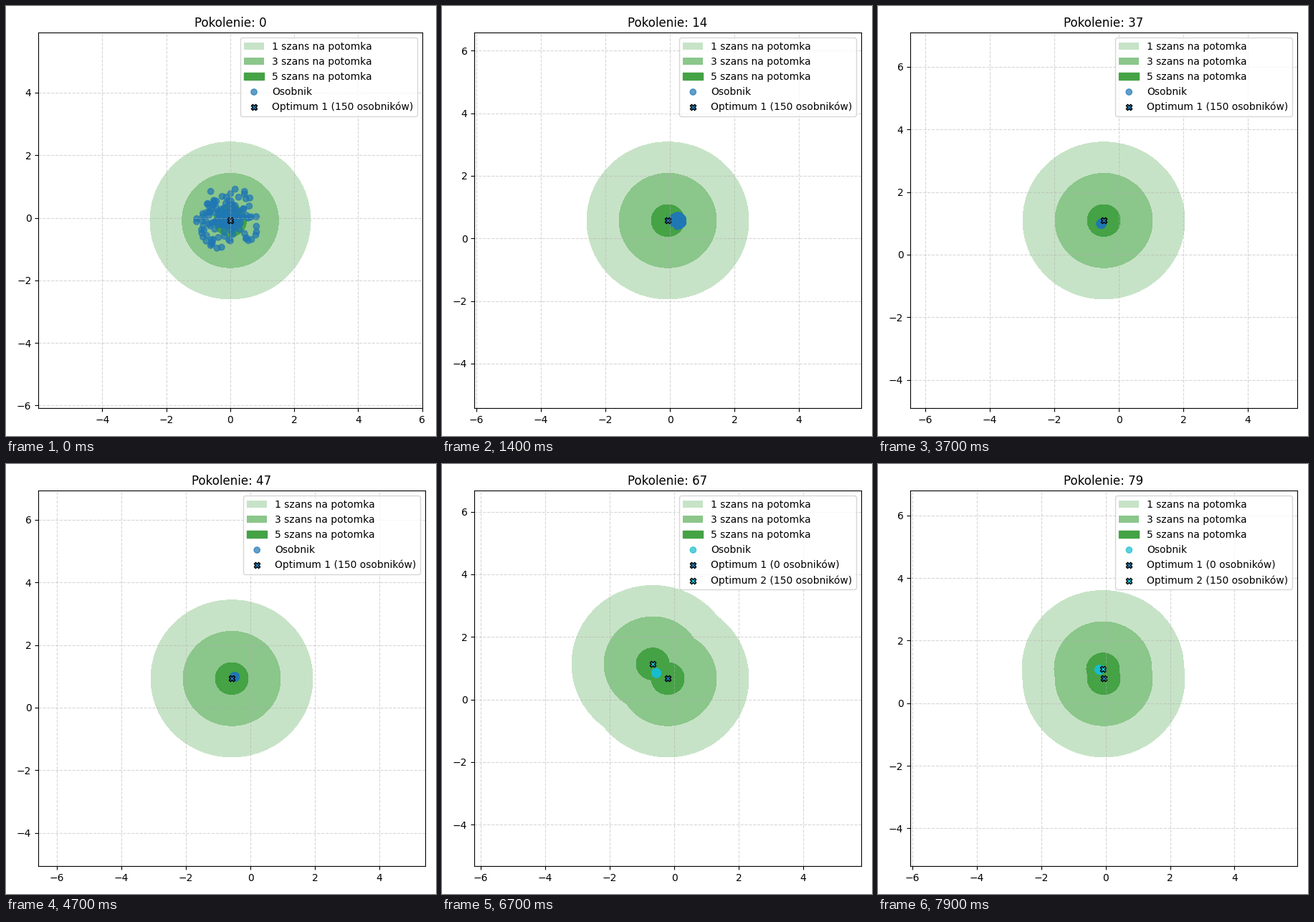
Animation of 600 by 600 pixels, one loop 8000 ms. Source, as a matplotlib script:

```python
import numpy as np
import matplotlib.pyplot as plt
from matplotlib.animation import FuncAnimation
from matplotlib.patches import Circle, Patch

FRAMES = 80
SIZE = 150
SPLIT = 50          # generation at which the second optimum appears
HALF = 6            # half of the visible range

HUES = np.array(["tab:blue", "tab:cyan"])
ZONES = [(1, 2.51, "#c7e3c7"), (3, 1.51, "#8bc68b"), (5, 0.51, "#45a245")]

gens = np.arange(FRAMES)


def walk(times, points, sigma, seed):
    """Random walk pinned to the given points at the given generations."""
    rng = np.random.default_rng(seed)
    path = np.empty((FRAMES, 2))
    for k, values in enumerate(np.transpose(points)):
        noise = np.cumsum(rng.normal(0, sigma, FRAMES))
        noise -= np.interp(gens, times, noise[times])
        path[:, k] = np.interp(gens, times, values) + noise
    return path


KEYS = [0, 14, 23, 37, 47, 67, 79]
opt1 = walk(KEYS, [(.005, -.087), (-.067, .573), (-.067, .646), (-.467, 1.09),
                   (-.58, .93), (-.2, .67), (-.055, .79)], .05, 4)
opt2 = walk([SPLIT, 67, 79], [opt1[SPLIT], (-.667, 1.135), (-.08, 1.095)], .05, 8)
center = walk(KEYS, [(-.05, 0), (.233, .56), (.055, .415), (-.544, .985),
                     (-.49, .985), (-.555, .847), (-.19, 1.07)], .015, 3)


def population(gen):
    """Disc of individuals that contracts as the generations pass."""
    rng = np.random.default_rng([17, gen])
    angle = rng.uniform(0, 2 * np.pi, SIZE)
    r = rng.uniform(0, .05 + np.exp(-gen / 7), SIZE)
    return center[gen] + np.column_stack([r * np.cos(angle), r * np.sin(angle)])


fig, ax = plt.subplots(figsize=(6, 6), dpi=100)


def update(gen):
    ax.clear()
    cx, cy = opt1[gen]
    optima = [opt1[gen]] + ([opt2[gen]] if gen >= SPLIT else [])

    handles = []
    for chances, radius, color in ZONES:
        for spot in optima:
            ax.add_patch(Circle(spot, radius, color=color, lw=0,
                                antialiased=False, zorder=.5 + chances / 20))
        handles.append(Patch(facecolor=color, edgecolor=color, lw=chances // 5,
                             label=f"{chances} szans na potomka"))

    pop = population(gen)
    owner = np.argmin([np.hypot(*(pop - spot).T) for spot in optima], axis=0)
    handles.append(ax.scatter(*pop.T, c=HUES[owner], alpha=.7, label="Osobnik"))

    for i, spot in enumerate(optima):
        label = f"Optimum {i + 1} ({np.sum(owner == i)} osobników)"
        handles.append(ax.scatter(*spot, c=HUES[i], marker="X",
                                  edgecolors="black", label=label))

    ax.set_xlim(cx - HALF, cx + HALF)
    ax.set_ylim(cy - HALF, cy + HALF)
    ax.grid(True, linestyle="--", alpha=.5)
    ax.set_title(f"Pokolenie: {gen}")
    ax.legend(handles=handles, loc="upper right")
    fig.tight_layout()


anim = FuncAnimation(fig, update, frames=FRAMES, interval=100,
                     repeat=True, repeat_delay=0)
plt.show()
```
